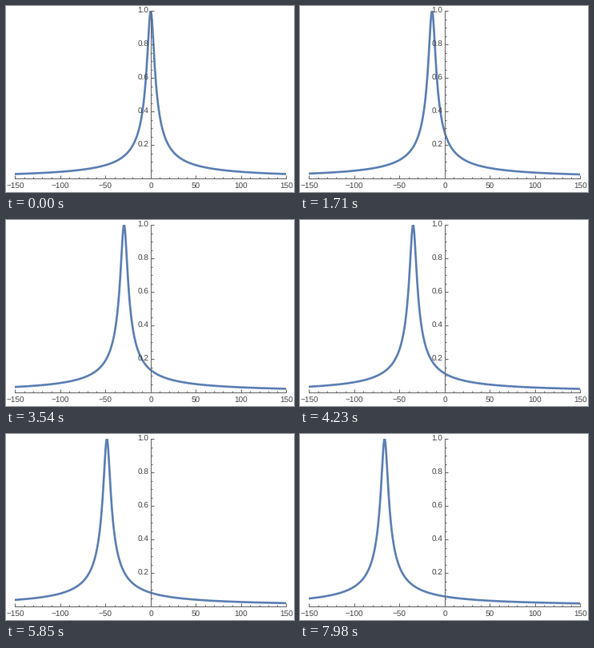
A matplotlib script for the animation above (8000 ms loop, 360x233 px).

```python
import numpy as np
import matplotlib.pyplot as plt
from matplotlib.animation import FuncAnimation
from matplotlib.patches import Rectangle

W, H, DPI = 360, 233, 100
PX = 72 / DPI                    # points per pixel
X0, Y0 = 180.9, 216.1            # where the axes cross
SX, SY = 1.13, 210               # pixels per unit
MAJOR, MINOR = 4.2, 2.4          # tick lengths
GRAY, BLUE = "#666666", "#5e81b5"
TICK = 20                        # ms per drawn frame
STEP = 30                        # ms per step of the motion
SHIFT = 0.25                     # peak moves left by this much each step
WIDTH = 4.0                      # width of the peak

plt.rcParams["text.hinting"] = "none"


def px(x):
    return X0 + SX * x


def py(y):
    return Y0 - SY * y


def add_segments(segments):
    xs, ys = [], []
    for xa, ya, xb, yb in segments:
        xs += [xa, xb, np.nan]
        ys += [ya, yb, np.nan]
    ax.plot(xs, ys, color=GRAY, lw=PX, zorder=3,
            solid_capstyle="butt", snap=True)


def label(x, y, text, align):
    ax.text(x, y, text, ha=align, va="baseline", color="#444444",
            family="Liberation Sans", size=10 * PX, zorder=4)


fig = plt.figure(figsize=(W / DPI, H / DPI), dpi=DPI, facecolor="white")
ax = fig.add_axes([0, 0, 1, 1])
ax.set_xlim(0, W)
ax.set_ylim(H, 0)
ax.axis("off")

lines = [(px(-150), Y0, px(150), Y0), (X0, Y0, X0, py(1))]
for x in range(-150, 151, 10):
    major = x % 50 == 0
    lines.append((px(x), Y0, px(x), Y0 - (MAJOR if major else MINOR)))
    if major:
        label(px(x), 229.3, str(x).replace("-", "\u2212"), "center")
for k in range(1, 21):
    y, major = k / 20, k % 4 == 0
    lines.append((X0, py(y), X0 + (MAJOR if major else MINOR), py(y)))
    if major:
        label(178.2, py(y) + 3.2, f"{y:.1f}", "right")
add_segments(lines)

grid = np.linspace(-150, 150, 1201)
curve, = ax.plot([], [], color=BLUE, lw=2.7 * PX, zorder=2, snap=False,
                 solid_joinstyle="round")
curve.set_clip_path(Rectangle((px(-150), 6), 300 * SX, SY + 2,
                              transform=ax.transData))


def update(i):
    center = -SHIFT * (i * TICK // STEP)
    value = 1 / np.sqrt(1 + ((grid - center) / WIDTH) ** 2)
    curve.set_data(px(grid), py(value))
    return curve,


anim = FuncAnimation(fig, update, frames=8000 // TICK, interval=TICK,
                     init_func=lambda: update(0), repeat=True,
                     repeat_delay=0, cache_frame_data=False)
plt.show()
```
